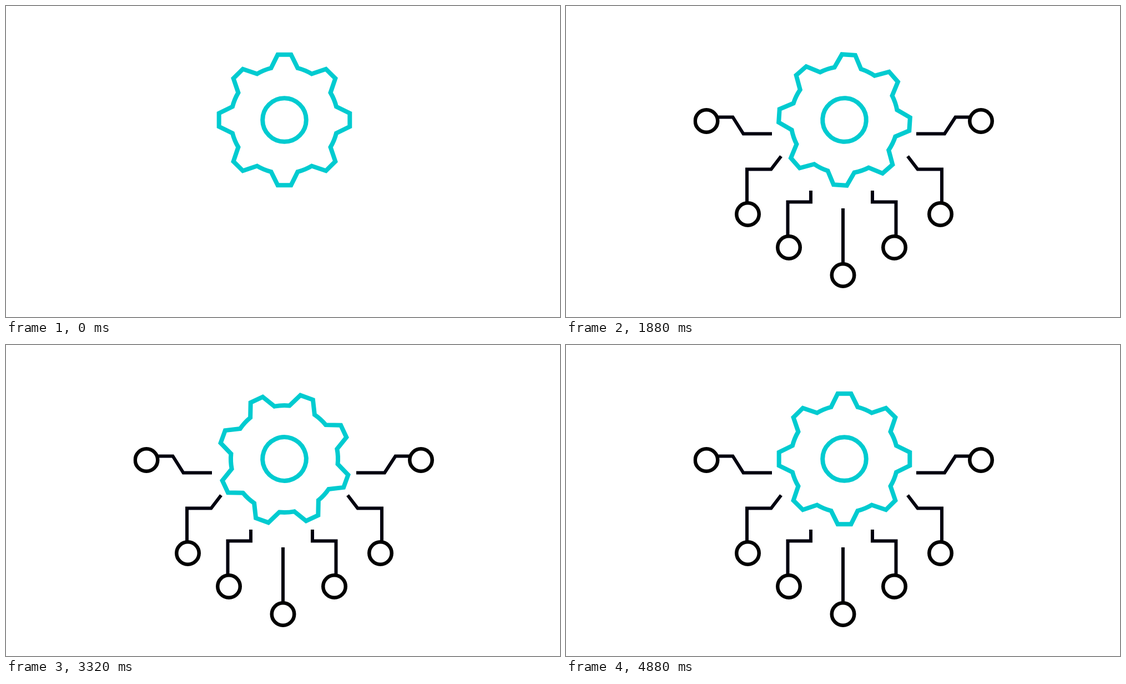
Animation of 998x561 px, one loop 5.93 s. Source, as an HTML page with a canvas:

```html
<!DOCTYPE html>
<html lang="en">
<head>
<meta charset="utf-8">
<title>Gear with branches</title>
<style>
html, body { margin: 0; width: 100%; height: 100%; overflow: hidden; background: #fff; }
canvas { display: block; }
</style>
</head>
<body>
<canvas id="stage" width="998" height="561"></canvas>
<script>
const ctx = document.getElementById('stage').getContext('2d');
const W = 998, H = 561, LOOP = 5930, STEP = 40, TURN = 4880, WIPE = 870;
const TEAL = '#00cbd0', INK = '#00000f';

// Each branch: line path, node centre, wipe direction, wipe start and end
const branches = [
  ['M371 230.5H319.5L300.5 200.5H272', 253, 207.5, 'left', 371, 229.5],
  ['M631 230.5H682L701.5 200.5H729', 747.5, 207.5, 'right', 631, 771.5],
  ['M387.5 271L369.5 294.5H326V354', 327.5, 375.5, 'down', 269, 399.5],
  ['M615.5 271L633.5 294.5H677V354', 674.5, 375.5, 'down', 269, 399.5],
  ['M441 333V353.5H399.5V414', 401.5, 435.5, 'down', 333, 459.5],
  ['M552 333V353.5H594.5V414', 591.5, 435.5, 'down', 333, 459.5],
  ['M499 365V465', 499, 485.5, 'down', 365, 509.5]
].map(([d, ...rest]) => [new Path2D(d), ...rest]);

function makeGear() {
  const path = new Path2D(), valley = Math.atan2(24, 93.5), r = Math.hypot(24, 93.5);
  for (let i = 0; i < 8; i++) {
    const a = i * Math.PI / 4, c = Math.cos(a), s = Math.sin(a);
    const to = (x, y) => path.lineTo(x * c - y * s, x * s + y * c);
    to(-24, -93.5);
    to(-12, -117.8);
    to(12, -117.8);
    to(24, -93.5);
    const up = a - Math.PI / 2;
    path.arc(0, 0, r, up + valley, up + Math.PI / 4 - valley);
  }
  path.closePath();
  return path;
}
const gear = makeGear();

function stroke(path, color, width) {
  ctx.strokeStyle = color;
  ctx.lineWidth = width;
  ctx.stroke(path);
}

function ring(x, y, r, color, width) {
  const path = new Path2D();
  path.arc(x, y, r, 0, 2 * Math.PI);
  ctx.fillStyle = '#fff';
  ctx.fill(path);
  stroke(path, color, width);
}

function drawBranch([line, x, y, dir, from, to], p) {
  const edge = from + (to - from) * p;
  ctx.save();
  ctx.beginPath();
  if (dir === 'left') ctx.rect(edge, 0, W - edge, H);
  else if (dir === 'right') ctx.rect(0, 0, edge, H);
  else ctx.rect(0, 0, W, edge);
  ctx.clip();
  stroke(line, INK, 6);
  ring(x, y, 20.25, '#000', 6.5);
  ctx.restore();
}

function draw(t) {
  ctx.fillStyle = '#fff';
  ctx.fillRect(0, 0, W, H);
  const p = Math.min(1, t / WIPE);
  if (p > 0) branches.forEach(b => drawBranch(b, p));
  ctx.save();
  ctx.translate(501.5, 205.5);
  ctx.rotate(2 * Math.PI * Math.min(1, t / TURN));
  stroke(gear, TEAL, 8);
  ring(0, 0, 39.3, TEAL, 8);
  ctx.restore();
}

const start = performance.now();
function tick() {
  const t = (performance.now() - start) % LOOP;
  draw(Math.floor(t / STEP) * STEP);
  requestAnimationFrame(tick);
}
tick();
</script>
</body>
</html>
```
